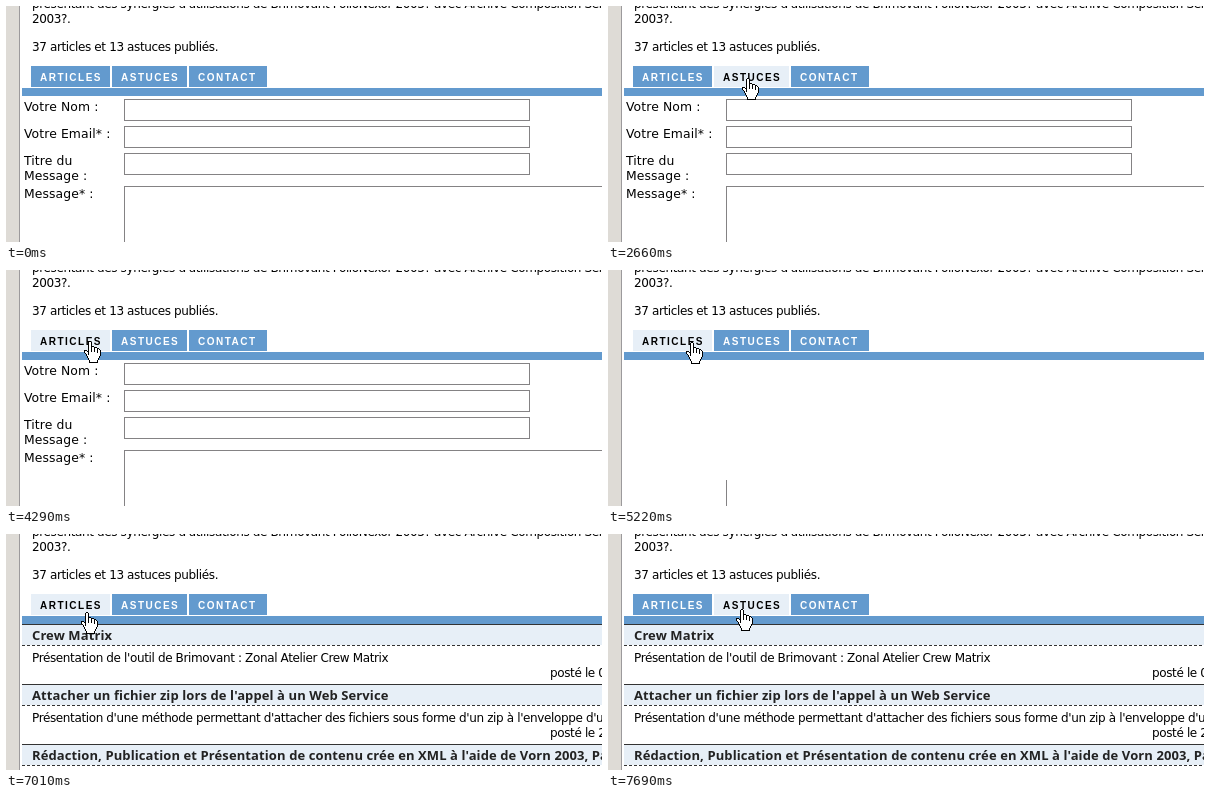
Recreate the animation shown at these times as an HTML page. Size 596 by 236 pixels, loop 8 s.

```html
<!DOCTYPE html>
<html lang="fr">
<head>
<meta charset="utf-8">
<title>Onglets</title>
<style>
  html, body { margin: 0; width: 100%; height: 100%; overflow: hidden; background: #fff; }
  svg { display: block; width: 596px; height: 236px; }
  rect, path { shape-rendering: crispEdges; }
  text { font: 12px "DejaVu Sans", sans-serif; white-space: pre; }
  .body { letter-spacing: -.37px; }
  .title { font: bold 13px "Noto Sans", "Open Sans", sans-serif; fill: #222; letter-spacing: .1px; }
  .label { font-size: 12.4px; letter-spacing: .1px; }
  .tab { font: bold 10px "Liberation Sans", Arial, sans-serif; letter-spacing: 1.5px; }
  .field { fill: #fff; stroke: #848284; }
  .cursor { fill: #fff; stroke: #000; }
</style>
</head>
<body>
<svg id="stage" viewBox="0 0 596 236"></svg>
<script>
const BLUE = '#639ace', PALE = '#e7eff7', LOOP = 8000;
const stage = document.getElementById('stage');

function add(parent, tag, attrs, text) {
  const el = document.createElementNS('http://www.w3.org/2000/svg', tag);
  for (const key in attrs) el.setAttribute(key, attrs[key]);
  if (text) el.textContent = text;
  parent.append(el);
  return el;
}
const group = () => add(stage, 'g', {});
const box = (g, x, y, width, height, fill) => add(g, 'rect', { x, y, width, height, fill });
const write = (g, x, y, text, cls = 'body') => add(g, 'text', { x, y, class: cls }, text);
const field = (g, y, width, height) =>
  add(g, 'rect', { x: 118.5, y: y + .5, width, height, class: 'field' });
const show = (el, on) => el.setAttribute('visibility', on ? 'visible' : 'hidden');

// Page frame and introduction
const page = group();
box(page, 0, 0, 13, 236, '#dedbd6');
box(page, 13, 0, 1, 236, '#9c9a9c');
write(page, 26, 2, "présentant des synergies d'utilisations de Brimovant FolioNexor 2003? avec Archive Composition Server");
write(page, 26, 17, '2003?.');
write(page, 26, 45, '37 articles et 13 astuces publiés.');
box(page, 16, 82, 580, 8, BLUE);

const tabs = [['ARTICLES', 25, 79], ['ASTUCES', 106, 75], ['CONTACT', 183, 78]].map(([name, x, w]) => ({
  x, w,
  back: box(page, x, 60, w, 21, BLUE),
  text: write(page, x + 9, 75, name, 'tab')
}));

// Contact form
const form = group();
[['Votre Nom :', 105], ['Votre Email* :', 132], ['Titre du', 159], ['Message :', 174], ['Message* :', 192]]
  .forEach(([text, y]) => write(form, 18, y, text, 'label'));
[93, 120, 147].forEach(y => field(form, y, 405, 21));
field(form, 180, 600, 200);
const wipe = box(stage, 16, 92, 580, 118, '#fff');

// Article list
const list = group();
const rows = [
  ['Crew Matrix', "Présentation de l'outil de Brimovant : Zonal Atelier Crew Matrix", '03/02'],
  ["Attacher un fichier zip lors de l'appel à un Web Service",
   "Présentation d'une méthode permettant d'attacher des fichiers sous forme d'un zip à l'enveloppe d'un message", '21/01'],
  ["Rédaction, Publication et Présentation de contenu crée en XML à l'aide de Vorn 2003, Partie 1", '', '']
].map(([title, text, date], i) => {
  const y = 90 + i * 60;
  const back = box(list, 16, y, 580, 21, PALE);
  box(list, 16, y, 580, 1, '#333');
  add(list, 'path', { d: `M16 ${y + 21.5}H596`, stroke: '#333', 'stroke-dasharray': '3 2' });
  const head = write(list, 26, y + 16, title, 'title');
  write(list, 26, y + 38, text);
  if (date) write(list, 544, y + 53, 'posté le ' + date);
  return { back, head };
});

// Pointers, with the hot spot at the group's zero point
const cursor = group();
cursor.setAttribute('class', 'cursor');
const arrow = add(cursor, 'path', { d: 'M.5 .5v16l3-3h1l3 7h1l1-1l-3-7h5z' });
const hand = add(cursor, 'g', { transform: 'translate(-4.5 .5)' });
add(hand, 'path', { d: 'M5 0H6L7 1V5H9L10 6H12L13 7H14L16 9V14L15 15V16L14 17V18L13 19V21H5V19L4 18V17L3 16V15L2 14V13L0 11V9H2L4 11V1Z' });
add(hand, 'path', { d: 'M7 5V10M10 6V10M13 7V11M4 10V13', fill: 'none' });

// Pointer moves: start, end, number of positions, first point, last point
const moves = [
  [1060, 1360, 6, 5, 75, 66, 74],
  [1690, 2060, 6, 68, 74, 134, 72],
  [2660, 2960, 6, 139, 72, 203, 74],
  [3560, 4290, 12, 193, 70, 83, 71],
  [4890, 4890, 1, 83, 72, 83, 72],
  [5880, 5880, 1, 82, 72, 82, 72],
  [6810, 6810, 1, 77, 73, 77, 73],
  [7010, 7190, 4, 80, 78, 109, 94],
  [7250, 7320, 2, 121, 90, 130, 84],
  [7450, 7690, 4, 131, 82, 133, 75]
];

function pointer(t) {
  const move = moves.filter(m => m[0] <= t).pop();
  if (!move) return null;
  const [start, end, count, x0, y0, x1, y1] = move;
  const gaps = count - 1;
  const p = gaps ? Math.min(1, Math.floor((t - start) / (end - start) * gaps + 1e-6) / gaps) : 1;
  return [Math.round(x0 + (x1 - x0) * p), Math.round(y0 + (y1 - y0) * p)];
}

function draw(t) {
  const at = pointer(t);
  const [x, y] = at || [-99, -99];
  let overTab = false;
  for (const tab of tabs) {
    const over = x >= tab.x && x < tab.x + tab.w && y >= 60 && y < 81;
    overTab = overTab || over;
    tab.back.setAttribute('fill', over ? PALE : BLUE);
    tab.text.setAttribute('fill', over ? '#000' : '#fff');
  }
  const loaded = t >= 5880, lit = loaded && y >= 84;
  rows[0].back.setAttribute('fill', lit ? BLUE : PALE);
  rows[0].head.style.fill = lit ? '#fff' : '';
  show(form, !loaded);
  show(wipe, t >= 5220 && !loaded);
  show(list, loaded);
  show(arrow, at && !overTab);
  show(hand, at && overTab);
  cursor.setAttribute('transform', `translate(${x} ${y})`);
}

const begin = performance.now();
function tick() {
  draw((performance.now() - begin) % LOOP);
  requestAnimationFrame(tick);
}
tick();
</script>
</body>
</html>
```
